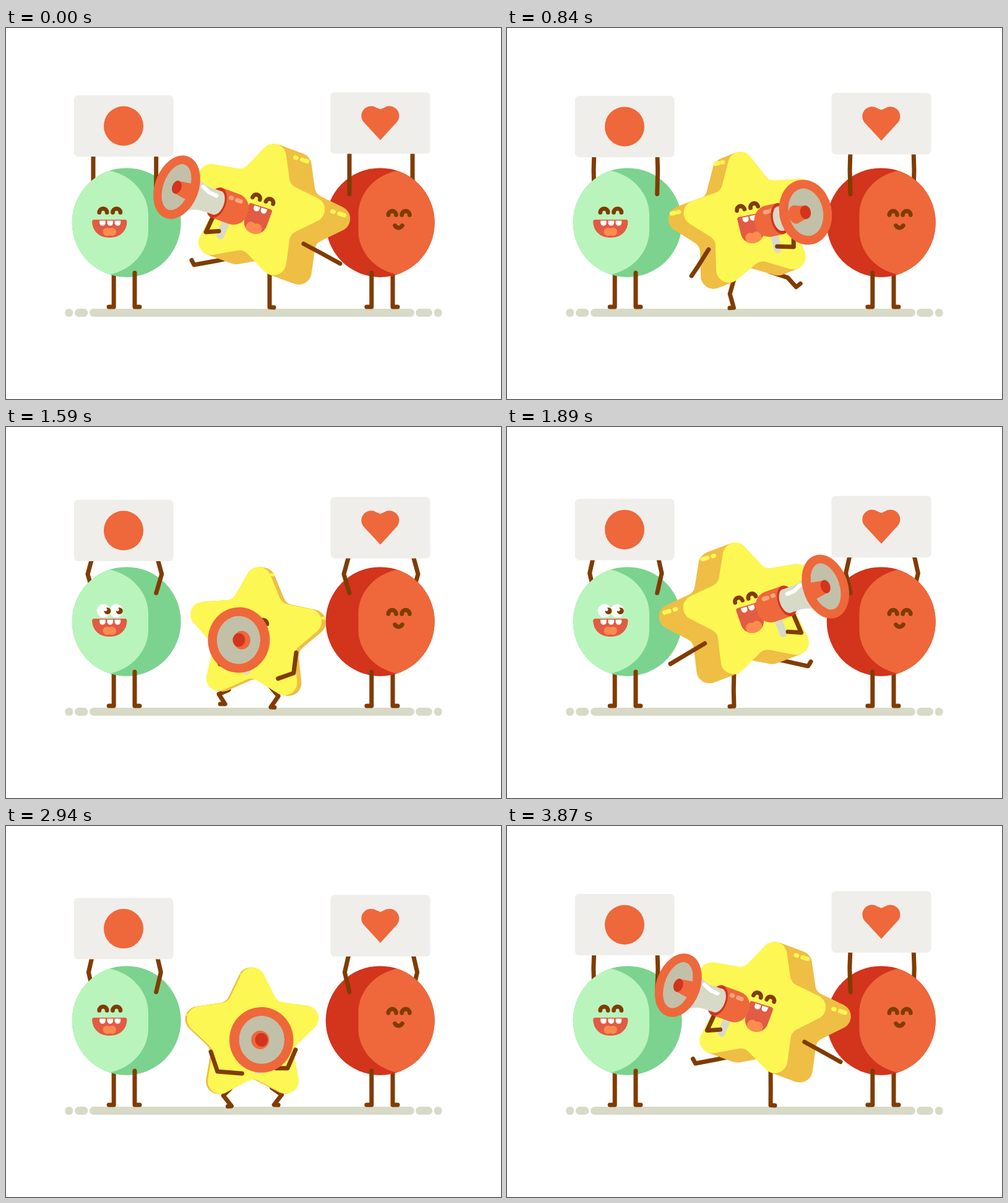
An HTML page with a canvas that plays this animation: 800 px wide and 600 px high, repeating every 3900 ms.

```html
<!DOCTYPE html>
<html lang="en">
<head>
<meta charset="utf-8">
<title>Cheering friends</title>
<style>
  html, body { margin: 0; width: 100%; height: 100%; overflow: hidden; background: #fff; }
  canvas { display: block; width: 800px; height: 600px; }
</style>
</head>
<body>
<canvas id="stage" width="800" height="600"></canvas>
<script>
const ctx = document.getElementById('stage').getContext('2d');
const LOOP = 3900, SWING = 1300, BOUNCE = SWING / 3, STEP = 30;
const C = {
  brown: '#803c00', yellow: '#fdf753', side: '#efbe45', orange: '#ee683b', red: '#d2341c',
  mouth: '#e25b43', tongue: '#ff8b4f', peach: '#ffa57d', mint: '#b9f4bc', green: '#7bd38f',
  stone: '#d8dac8', shade: '#c2c0a8', board: '#f0eeea', white: '#fff'
};
const TAU = Math.PI * 2, RAD = Math.PI / 180;

function fill(color, build) {
  ctx.beginPath();
  build();
  ctx.fillStyle = color;
  ctx.fill();
}
const oval = (color, x, y, rx, ry = rx, turn = 0) =>
  fill(color, () => ctx.ellipse(x, y, rx, ry, turn, 0, TAU));
const box = (color, x, y, w, h, r) => fill(color, () => ctx.roundRect(x, y, w, h, r));

// points is a flat list: x, y, x, y, ...
function line(points, color = C.brown, width = 7) {
  ctx.beginPath();
  for (let i = 0; i < points.length; i += 2) ctx.lineTo(points[i], points[i + 1]);
  ctx.strokeStyle = color;
  ctx.lineWidth = width;
  ctx.lineCap = ctx.lineJoin = 'round';
  ctx.stroke();
}

function arch(x, y, r, from = Math.PI, to = TAU) {
  ctx.beginPath();
  ctx.arc(x, y, r, from, to);
  ctx.strokeStyle = C.brown;
  ctx.lineWidth = 6.8;
  ctx.lineCap = 'round';
  ctx.stroke();
}

function group(draw) {
  ctx.save();
  draw();
  ctx.restore();
}

// Linear blend between rows of [position, ...values].
function blend(rows, u) {
  let i = 1;
  while (i < rows.length - 1 && u > rows[i][0]) i++;
  const a = rows[i - 1], b = rows[i], k = (u - a[0]) / (b[0] - a[0]);
  return a.slice(1).map((v, n) => v + (b[n + 1] - v) * k);
}
const mirror = (points, sum) => points.map((v, i) => i % 2 ? v : sum - v);

// ---- ground, signs and the two round friends ----

function ground() {
  oval(C.stone, 101.8, 460.5, 6.6);
  box(C.stone, 111, 454, 21.5, 13, 6.5);
  box(C.stone, 135, 454, 525, 13, 6.5);
  box(C.stone, 662, 454, 27, 13, 6.5);
  oval(C.stone, 698.2, 460.5, 6.6);
}

function signDrop(t) {
  const q = t % BOUNCE / BOUNCE;
  const ease = k => (1 - Math.cos(Math.PI * k)) / 2;
  return 9 * (q < 0.5 ? ease(q / 0.5) : q < 0.71 ? 1 : ease((1 - q) / 0.29));
}

const signArm = (x, dir, s) => line([x, 196 + s, x + dir * s, 229 + s, x, 268.5]);

function ballBody(cx, flip, lit, dark) {
  group(() => {
    ctx.translate(cx, 314.7);
    ctx.scale(flip, 1);
    oval(dark, 0, 0, 88, 88.3);
    ctx.beginPath();
    ctx.ellipse(0, 0, 88, 88.3, 0, 0, TAU);
    ctx.clip();
    fill(lit, () => {
      ctx.moveTo(-100, -100);
      ctx.lineTo(-40, -90);
      ctx.lineTo(-27, -84);
      ctx.bezierCurveTo(10, -76, 35.3, -46, 35.3, -13);
      ctx.lineTo(35.3, 13);
      ctx.bezierCurveTo(35.3, 46, 10, 76, -27, 84);
      ctx.lineTo(-40, 90);
      ctx.lineTo(-100, 100);
    });
  });
}

const leg = (x, top, dir) => line([x, top, x, 451, x + dir * 8, 451]);

function tooth(x, y, w, h) {
  box(C.white, x - w / 2, y, w, h, [0, 0, w / 2, w / 2]);
}

function greenFriend(s, awake) {
  signArm(141, -1, s);
  leg(174.2, 390, -1);
  ballBody(194.7, 1, C.mint, C.green);
  leg(208, 396, 1);
  signArm(242.7, 1, s);
  box(C.board, 110, 108.8 + s, 160.5, 99.2, 6.5);
  oval(C.orange, 190, 158.5 + s, 32);

  if (awake) {
    for (const x of [157.7, 178.2]) oval(C.white, x, 297.3, 10.8);
    for (const x of [164, 183.3]) {
      oval(C.brown, x, 297.4, 5.5);
      oval(C.white, x - 3.2, 295.2, 2.6);
    }
  } else {
    arch(157, 298.3, 6.2);
    arch(178.7, 298.3, 6.2);
  }
  group(() => {
    ctx.beginPath();
    ctx.roundRect(139, 309.8, 56.7, 29.2, [4, 4, 27, 27]);
    ctx.clip();
    ctx.fillStyle = C.mouth;
    ctx.fill();
    for (const x of [156, 168.3, 180.4]) tooth(x, 311.5, 9.6, 8.3);
    oval(C.tongue, 163.3, 329.6, 6.7);
    oval(C.tongue, 171.3, 329.6, 6.7);
  });
}

function redFriend(s) {
  signArm(657, 1, s);
  leg(625, 390, 1);
  ballBody(604.7, -1, C.orange, C.red);
  leg(590.8, 396, -1);
  signArm(555, -1, s);
  box(C.board, 524.5, 104 + s, 161, 99.5, 6.5);
  fill(C.orange, () => {
    const y = 104 + s;
    ctx.moveTo(605, y + 77.3);
    ctx.lineTo(578.8, y + 49);
    ctx.arc(590, y + 38, 15.7, Math.PI * 0.75, -0.32 * Math.PI);
    ctx.lineTo(605, y + 27.5);
    ctx.arc(619.7, y + 38, 15.7, -0.68 * Math.PI, Math.PI * 0.25);
  });
  arch(624.2, 302.3, 6.3);
  arch(646, 302.3, 6.3);
  arch(634.5, 316.5, 6.6, 0.15 * Math.PI, 0.85 * Math.PI);
}

// ---- star ----

// Left limbs against the swing, -1 (facing left) to 1 (facing right); the right ones mirror them.
const LEG = [
  [-1, 380, 368, 340, 376.5, 304, 383, 300, 375.5],
  [-0.31, 360, 414, 339, 424, 342, 446, 333, 442],
  [-0.17, 360, 425, 344, 432, 354, 448, 346, 448],
  [0, 366, 422, 350, 436.5, 364, 453, 358, 453.5],
  [0.31, 366, 418, 355, 434, 366, 453, 360, 453.5],
  [1, 367, 395, 367, 425, 367, 451.5, 360, 452]
];
const ARM = [
  [-1, 337, 300, 323, 330, 344, 328.5],
  [-0.31, 337, 355, 347, 372, 378, 372],
  [-0.07, 332, 362, 345, 392, 363, 392],
  [0.07, 331, 365, 342, 397, 382, 400],
  [0.17, 331, 365, 335, 398, 360, 407],
  [0.31, 331, 365, 324, 400, 327, 416],
  [1, 319, 349, 289, 365, 260, 381]
];

function starShape() {
  const path = new Path2D(), pts = [];
  for (let i = 0; i < 10; i++) {
    const a = (i * 36 - 90) * RAD, r = i % 2 ? 68 : 137;
    pts.push([Math.cos(a) * r, Math.sin(a) * r]);
  }
  const last = pts[9];
  path.moveTo((pts[0][0] + last[0]) / 2, (pts[0][1] + last[1]) / 2);
  pts.forEach((p, i) => path.arcTo(...p, ...pts[(i + 1) % 10], i % 2 ? 18 : 20.5));
  path.closePath();
  return path;
}
const STAR = starShape();

function starFace(v) {
  const cx = 5.5 * v;
  for (const x of [-11, 11.4]) arch(cx + x, -17 - 3 * (1 - v), 6.2);
  group(() => {
    ctx.translate(cx, 0);
    ctx.beginPath();
    ctx.moveTo(-16, -7.5);
    ctx.lineTo(16, -7.5);
    ctx.quadraticCurveTo(20, -7.5, 20, -3.5);
    ctx.lineTo(19, 20);
    ctx.bezierCurveTo(18, 44, -17, 46, -19, 20);
    ctx.lineTo(-19.5, -3.5);
    ctx.quadraticCurveTo(-19.5, -7.5, -16, -7.5);
    ctx.clip();
    ctx.fillStyle = C.mouth;
    ctx.fill();
    tooth(-5.5, -5.5, 9.8, 8.5);
    tooth(6.5, -5.5, 9.8, 8.5);
    oval(C.tongue, -5, 29, 8);
    oval(C.tongue, 5, 29, 8);
    box(C.tongue, -13, 29, 26, 12, 0);
  });
}

function starBody(cx, cy, turn, v, f) {
  const dx = 41 * v, dy = 15 * f;
  const place = k => {
    ctx.translate(cx + dx * k, cy + dy * k);
    ctx.rotate(turn);
  };
  const copies = Math.ceil(dx) + 1;
  for (let i = copies; i >= 0; i--) group(() => {
    place(i / copies);
    ctx.fillStyle = i ? C.side : C.yellow;
    ctx.fill(STAR);
  });
  group(() => {
    place(0);
    const w = 7 * Math.min(1, 4 * v);
    for (const [x, y] of [[17 + 17 * v, -99.5], [105 + 13 * v, -35]]) {
      if (w < 1) continue;
      line([x, y, x + 2 * v, y], C.yellow, w);
      line([x + 11.5 * v, y, x + 20 * v, y], C.yellow, w);
    }
    starFace(v);
  });
}

function megaphone(x, y, v, holdArm) {
  const tilt = 20 * v * RAD;
  const inFrame = draw => group(() => {
    ctx.translate(x, y);
    ctx.rotate(tilt);
    draw();
  });
  inFrame(() => line([94 * v, 20, 93 * v, 49], C.stone, 12.5));
  holdArm();
  inFrame(() => {
    // grip
    box(C.orange, 69 * v - 8, -24, 28 * v + 33, 51, [8, 23, 23, 8]);
    line([88 * v, -14, 89.5 * v, -14], C.peach, 7 * Math.min(1, v * 2));
    line([99 * v, -13.7, 105 * v, -13.7], C.peach, 7 * Math.min(1, v * 2));
    oval(C.red, 69 * v, 1.5, 15, 25.5);
    // throat
    oval(C.stone, 70 * v, 1.5, 11, 20);
    fill(C.stone, () => {
      ctx.moveTo(5 * v, -50);
      ctx.quadraticCurveTo(28 * v, -19, 50 * v, -18.5);
      ctx.lineTo(71 * v, -18.5);
      ctx.lineTo(71 * v, 21.5);
      ctx.lineTo(50 * v, 22);
      ctx.quadraticCurveTo(28 * v, 24, 5 * v, 50);
    });
    line([40 * v, -15.5, 52 * v, -10, 65 * v, -9], C.white, 6.5);
    // bell
    oval(C.orange, 0, 0, 53 - 17.5 * v, 53);
    ctx.beginPath();
    ctx.ellipse(-0.5, 0, 38 - 16.5 * v, 39, 0, 0, TAU);
    ctx.clip();
    ctx.fillStyle = C.shade;
    ctx.fill();
    fill(C.orange, () => {
      ctx.moveTo(0, -10.5);
      ctx.lineTo(28 * v, -15);
      ctx.lineTo(28 * v, 15);
      ctx.lineTo(0, 10.5);
    });
    oval(C.orange, 28 * v, 0, 15 - 7 * v, 15);
    oval(C.red, 0, 0, 10.5 - 3 * v, 11);
  });
}

function star(t) {
  const phase = t / SWING * TAU;
  const u = -Math.cos(phase), v = Math.abs(u);
  const facing = u < 0 ? 1 : -1;
  const f = Math.sin(Math.PI * u / 2) ** 2;
  const turn = 18 * RAD * facing * Math.cos(phase - 0.05);
  const reach = Math.sin(1.1 * v) / Math.sin(1.1);
  const bellX = 400 + 2.5 * facing - (u < 0 ? 126.5 : 115) * reach;
  const bellY = 346 - 88.5 * f ** 1.5;

  const leftArm = blend(ARM, u), rightArm = mirror(blend(ARM, -u), 800);
  const [holding, free] = u < 0 ? [leftArm, rightArm] : [rightArm, leftArm];

  line(blend(LEG, u));
  line(mirror(blend(LEG, -u), 793));
  group(() => {
    if (facing < 0) {
      ctx.translate(800, 0);
      ctx.scale(-1, 1);
    }
    starBody(400 + 4.5 * Math.tanh(3 * v), 340 - 46.5 * f, turn, v, f);
    megaphone(bellX, bellY, v, () => line(facing < 0 ? mirror(holding, 800) : holding));
  });
  line(free);
}

function frame() {
  const t = Math.floor(performance.now() % LOOP / STEP) * STEP;
  const s = signDrop(t);
  ctx.fillStyle = C.white;
  ctx.fillRect(0, 0, 800, 600);
  ground();
  greenFriend(s, t >= 900 && t < 2700);
  redFriend(s);
  star(t);
  requestAnimationFrame(frame);
}
frame();
</script>
</body>
</html>
```
